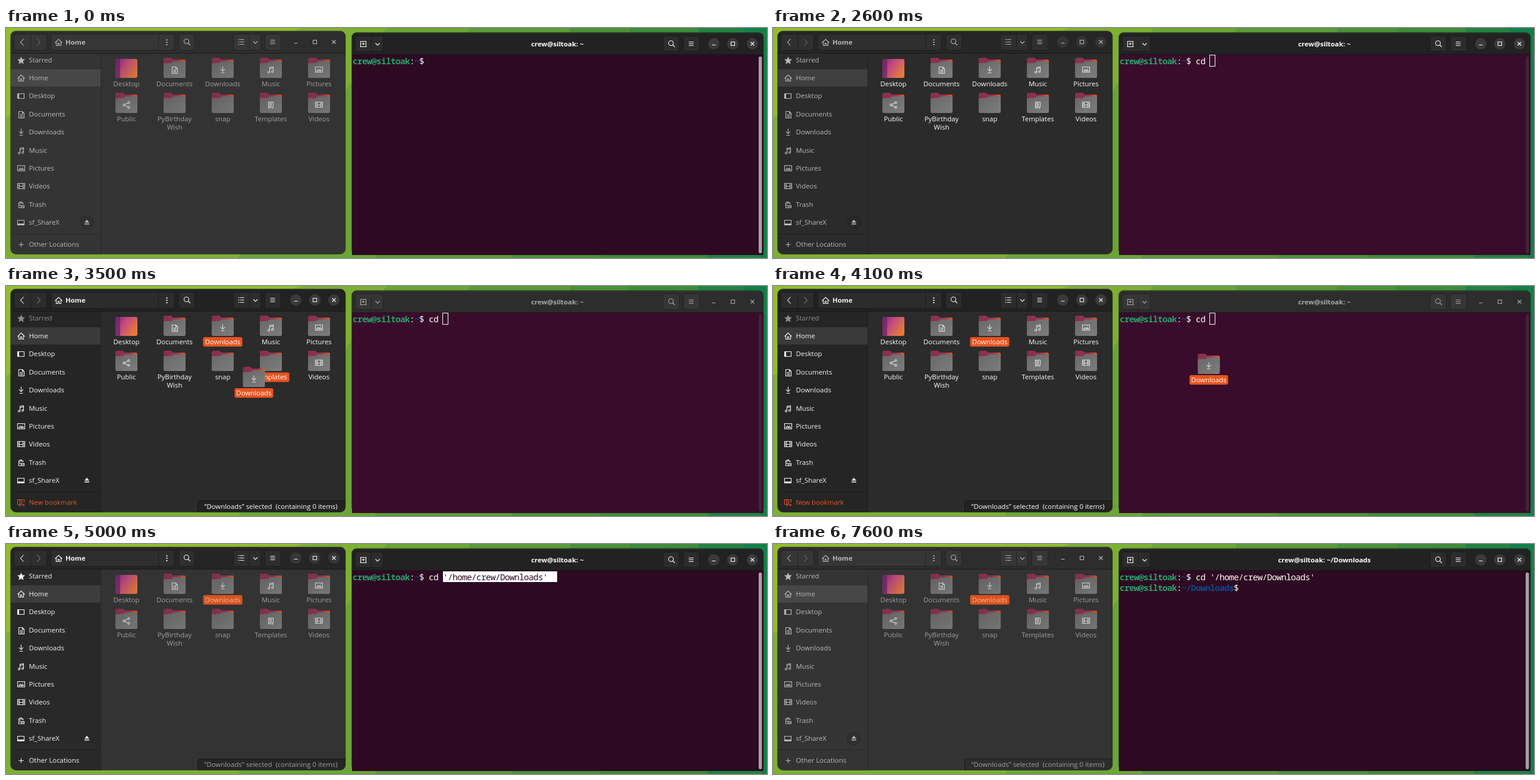
Recreate the animation shown at these times as an HTML page. Size 1280 by 387 pixels, loop 8.2 s.

```html
<!DOCTYPE html>
<html lang="en">
<head>
<meta charset="utf-8">
<title>Drag a folder into the terminal</title>
<style>
  html, body { margin: 0; width: 100%; height: 100%; overflow: hidden; background: #6ba536; }
  svg { display: block; width: 100vw; height: 100vh; }
  text { font: 500 11.4px "Open Sans", "Noto Sans", sans-serif; white-space: pre; }
  .bold { font-weight: 700; }
  .mid { text-anchor: middle; }
  .mono { font: 14.5px "Noto Sans Mono", "DejaVu Sans Mono", monospace; letter-spacing: -.7px; }
  .mono.bold { font-weight: 700; }
  .line { fill: none; stroke-width: 1.1; }
  .btn { fill: #fff; fill-opacity: .045; stroke: #000; stroke-opacity: .28; }
  .cut { stroke: #000; stroke-opacity: .35; }
  .fileText { fill: var(--fileText); }
  .fileLine { stroke: var(--fileText); }
  .termText { fill: var(--termText); }
  .termLine { stroke: var(--termText); }
  .label { fill: var(--label); }
</style>
</head>
<body>
<svg id="stage" viewBox="0 0 1280 387" xmlns="http://www.w3.org/2000/svg"></svg>
<script>
const LOOP = 8200, STEP = 100, CELL = 8;
const USER = 'crew', HOST = 'siltoak', LOGIN = `${USER}@${HOST}`;
const PASTED = `'/home/${USER}/Downloads'`;
const ORANGE = '#e95420', GREEN = '#26a269', BLUE = '#12488b', WHITE = '#ffffff';

// ---- markup helpers ----
const rect = (x, y, w, h, rx, attrs = '') =>
  `<rect x="${x}" y="${y}" width="${w}" height="${h}" rx="${rx}" ${attrs}/>`;
const text = (x, y, s, cls, attrs = '') =>
  `<text x="${x}" y="${y}" class="${cls}" ${attrs}>${s}</text>`;
const at = (x, y, body, attrs = '') =>
  `<g transform="translate(${x} ${y})" ${attrs}>${body}</g>`;
const line = (d, cls = '', attrs = '') => `<path d="${d}" class="line ${cls}" ${attrs}/>`;

// Line icons centred on 0,0
const GLYPH = {
  star: 'M0-5L1.5-1.6L5.2-1.3L2.4 1.2L3.3 5L0 3L-3.3 5L-2.4 1.2L-5.2-1.3L-1.5-1.6Z',
  home: 'M-6 .5L0-5.5L6 .5M-4-1V5H-1V1H1V5H4V-1',
  desktop: 'M-6-4H5V4H-6ZM-4-4V4M-5-4V4',
  doc: 'M-4-5H2L5-2V6H-4ZM2-5V-2H5M-2 0H3M-2 2H3M-2 4H3',
  down: 'M0-6V2M-3.6-1.4L0 2.3L3.6-1.4M-3 5H3',
  music: 'M-2 4V-4L4-5V3M-2-2L4-3M-5 4a1.5 1.5 0 1 0 3 0a1.5 1.5 0 1 0-3 0M1 3a1.5 1.5 0 1 0 3 0a1.5 1.5 0 1 0-3 0',
  picture: 'M-6-5H6V4H-6ZM-4 2L-1.5-1L.5 1L2.5-.5L4 2ZM2-3H3',
  video: 'M-6-5H6V4H-6ZM-3-5V4M3-5V4M-3 0H3M-6-2H-3M-6 1H-3M3-2H6M3 1H6',
  trash: 'M-5-3H4M-2-3V-5H1V-3M-4-3V5H-1M3-3V-1M-2-1V2M0 1H5V5H0ZM1 3H4',
  drive: 'M-6-4H5V4H-6ZM-6 2H5M-6 3H5',
  plus: 'M-4 0H4M0-4V4',
  mark: 'M-6-5H1V3H-6ZM-2-5V3M3-5H5V0M-4 5H0M2 4H6M4 2V6',
  share: 'M-2.6-.8L2.6-3.4M-2.6 .8L2.6 3.4M-5.6 0a1.6 1.6 0 1 0 3.2 0a1.6 1.6 0 1 0-3.2 0M2.4-4a1.6 1.6 0 1 0 3.2 0a1.6 1.6 0 1 0-3.2 0M2.4 4a1.6 1.6 0 1 0 3.2 0a1.6 1.6 0 1 0-3.2 0',
  ruler: 'M-4-5H-1V5H-4ZM-4-3H-2M-4 0H-2M-4 3H-2M1-5H4V3L2.5 5.5L1 3Z',
  find: 'M-5-1a4 4 0 1 0 8 0a4 4 0 1 0-8 0M2 2L5.5 5.5',
  menu: 'M-4-3H4M-4 0H4M-4 3H4',
  list: 'M-5-4H-3M-5 0H-3M-5 4H-3M-2-4H5M-2 0H5M-2 4H5',
  chevron: 'M-3.5-1.5L0 2L3.5-1.5',
  back: 'M2.5-5.5L-2.5 0L2.5 5.5',
  next: 'M-2.5-5.5L2.5 0L-2.5 5.5',
  tab: 'M-5 4V-5H4V4M-6 4H5M-3-1H2M-.5-3.5V1.5',
  min: 'M-3 2H3',
  max: 'M-3-3H3V3H-3Z',
  close: 'M-3-3L3 3M3-3L-3 3'
};
const icon = (name, x, y, cls, attrs = '') => at(x, y, line(GLYPH[name], cls, attrs));

function folder(name) {
  if (name === 'desktop') {
    return rect(-18.5, -15, 37, 32, 3, 'fill="url(#wall)"') +
      '<path d="M-10.5-15H-15.5a3 3 0 0 0-3 3V14a3 3 0 0 0 3 3H-10.5Z" fill="#6b2467" fill-opacity=".75"/>';
  }
  return '<path d="M-18.5 8V-14.5Q-18.5-17-16-17H-6.5Q-5-17-4-15.5L-3-14H16Q18.5-14 18.5-11.5V8Z" fill="url(#back)"/>' +
    '<path d="M-18.5-6Q-18.5-8-16.5-8H-6Q-5-8-4-9L-3-10Q-2-11-1-11H16.5Q18.5-11 18.5-9V14.5Q18.5 17 16 17H-16Q-18.5 17-18.5 14.5Z" fill="url(#front)"/>' +
    (name ? `<g class="mark">${icon(name, 0, 3.5, '', 'stroke="#dedede"')}</g>` : '');
}

const windowButtons = (xs, y, kind) =>
  ['min', 'max', 'close'].map((n, i) =>
    `<circle cx="${xs[i]}" cy="${y}" r="9.5" fill="#fff" fill-opacity=".11" class="${kind}Round"/>` +
    icon(n, xs[i], y, kind + 'Line')).join('');

// ---- wallpaper ----
const BANDS = [
  [-10, -800, '#93bd2d'], [500, -790, '#7cb033'], [640, 390, '#6ba536'], [780, 620, '#5a9a38'],
  [950, 850, '#4a9138'], [1050, 1000, '#3c8c3a'], [1165, 1180, '#228343'], [1240, 1270, '#128048']
];
const wallpaper = BANDS.map(([a, b, c]) =>
  `<path d="M${a} 0H1280V387H${b}Z" fill="${c}"/>`).join('');

// ---- file manager ----
const PLACES = [
  ['star', 'Starred'], ['home', 'Home'], ['desktop', 'Desktop'], ['doc', 'Documents'],
  ['down', 'Downloads'], ['music', 'Music'], ['picture', 'Pictures'], ['video', 'Videos'],
  ['trash', 'Trash'], ['drive', 'sf_ShareX'], ['plus', 'Other Locations']
];
const FOLDERS = [
  ['desktop', 'Desktop'], ['doc', 'Documents'], ['down', 'Downloads'], ['music', 'Music'],
  ['picture', 'Pictures'], ['share', 'Public'], ['', 'PyBirthday', 'Wish'], ['', 'snap'],
  ['ruler', 'Templates'], ['video', 'Videos']
];

const places = PLACES.map(([g, name], i) => {
  const y = g === 'plus' ? 364 : Math.round(53.5 + i * 30.4);
  const solid = g === 'star' ? 'style="fill:var(--fileText)"' : '';
  return `<g id="place${i}">` + icon(g, 25.5, y + .5, 'fileLine', solid) +
    text(38.5, y + 4, name, 'fileText') + '</g>';
}).join('');

const folders = FOLDERS.map(([g, name, more], i) => {
  const x = 202.5 + (i % 5) * 81, y = i < 5 ? 67 : 126;
  const pill = name === 'Downloads' ? rect(-33, 19, 66, 16, 3, 'id="picked"')
    : name === 'Templates' ? rect(-31, 19.5, 62, 16, 3, `id="target" fill="${ORANGE}"`) : '';
  return at(x, y, `<g class="pic">${folder(g)}</g>` + pill +
    text(0, 31, name, 'mid label') + (more ? text(0, 45, more, 'mid label') : ''), `id="item${i}"`);
}).join('');

const files =
  rect(7, 4.5, 564.5, 376.5, 10, 'fill="#1b2a12" fill-opacity=".55"') +
  '<g clip-path="url(#fileClip)">' +
  rect(8, 5, 563, 376, 0, 'style="fill:var(--fileBody)"') +
  rect(8, 43, 151, 338, 0, 'style="fill:var(--side)"') +
  rect(8, 69.5, 151, 29, 0, 'style="fill:var(--row)"') +
  '<path d="M159.5 43V381M8 346.5H159" stroke="#000" stroke-opacity=".22"/>' +
  rect(8, 5, 563, 37.5, 0, 'style="fill:var(--fileHead)"') +
  '<path d="M8 42.5H571" stroke="#000" stroke-opacity=".4"/>' +
  '<path d="M8 5.5H571" stroke="#fff" stroke-opacity=".07"/>' +
  [[13, 56], [75, 209], [290, 28], [382, 47], [435, 28]].map(([x, w]) =>
    rect(x + .5, 10.5, w - 1, 27, 4, 'class="btn"')).join('') +
  '<path class="cut" d="M41.5 11V37M256.5 11V37M409.5 11V37"/>' +
  icon('back', 27, 24, 'fileLine') + icon('next', 55, 24, 'fileLine', 'opacity=".4"') +
  icon('home', 88.5, 24.5, 'fileLine') + text(100, 28, 'Home', 'bold fileText') +
  '<path class="fileText" d="M269.5 19h2v2h-2zM269.5 23h2v2h-2zM269.5 27h2v2h-2z"/>' +
  icon('find', 304.5, 23.5, 'fileLine') + icon('list', 395.5, 23.5, 'fileLine') +
  icon('chevron', 419.5, 24, 'fileLine') + icon('menu', 448.5, 23.5, 'fileLine') +
  windowButtons([487.5, 519.5, 551.5], 23.5, 'file') +
  places +
  `<g id="bookmark">${icon('mark', 25.5, 364.5, '', `stroke="${ORANGE}"`)}` +
  text(38.5, 368, 'New bookmark', '', `fill="${ORANGE}"`) + '</g>' +
  '<circle id="ejectRing" cx="136" cy="327" r="11" fill="#000" fill-opacity=".08" stroke="#000" stroke-opacity=".2"/>' +
  '<path class="fileText" d="M136 322.5L140 327.5H132ZM132 329H140V330.5H132Z"/>' +
  folders +
  '<g id="status">' +
  '<path d="M322.5 382V366.5Q322.5 361.5 327.5 361.5H572V382Z" style="fill:var(--fileHead)" stroke="#111" stroke-opacity=".7"/>' +
  text(445.5, 375, '“Downloads” selected  (containing 0 items)', 'mid label') + '</g></g>';

// ---- terminal ----
const mono = (x, row, s, color, bold, attrs = '') =>
  text(x, 61 + row * 18, s, 'mono' + (bold ? ' bold' : ''), `fill="${color}" ${attrs}`);
const prompt = (row, path) => {
  const x = 583 + LOGIN.length * CELL;
  return mono(583, row, LOGIN, GREEN, true) + mono(x, row, ':', WHITE) +
    mono(x + CELL, row, path, BLUE, true) + mono(x + CELL * (1 + path.length), row, '$', WHITE);
};

const terminal =
  rect(581, 7, 693.5, 375, 9, 'fill="#14200f" fill-opacity=".6"') +
  '<g clip-path="url(#termClip)">' +
  rect(582, 8, 692, 374, 0, 'style="fill:var(--termBody)"') +
  rect(582, 8, 692, 37, 0, 'style="fill:var(--termHead)"') +
  '<path d="M582 8.5H1274" stroke="#fff" stroke-opacity=".07"/>' +
  '<path d="M582 44.5H1274" stroke="#000" stroke-opacity=".35"/>' +
  [[587, 48], [1105, 28], [1139, 28]].map(([x, w]) =>
    rect(x + .5, 13.5, w - 1, 26, 4, 'class="btn"')).join('') +
  '<path class="cut" d="M614.5 14V39"/>' +
  icon('tab', 601.5, 27.5, 'termLine') + icon('chevron', 625, 27, 'termLine') +
  icon('find', 1119.5, 26.5, 'termLine') + icon('menu', 1152.5, 26.5, 'termLine') +
  windowButtons([1190.5, 1222.5, 1255.5], 26.5, 'term') +
  text(927.5, 30.5, '', 'bold mid termText', 'id="title"') +
  rect(1266, 48, 5.5, 331, 2.7, 'style="fill:var(--bar)"') +
  prompt(0, '~') +
  mono(711, 0, '', WHITE, false, 'id="typed"') +
  rect(735, 46, 23 * CELL, 18, 0, 'id="glow" fill="#fff"') +
  mono(735, 0, PASTED, WHITE, false, 'id="pasted"') +
  `<g id="second">${prompt(1, '~/Downloads')}</g>` +
  rect(0, 0, CELL, 18, 0, 'id="cursor"') + '</g>';

const stage = document.getElementById('stage');
stage.innerHTML = `<defs>
  <linearGradient id="wall" x2="1" y2=".6"><stop stop-color="#7b2a72"/><stop offset=".45" stop-color="#c24a80"/><stop offset="1" stop-color="#e57a3c"/></linearGradient>
  <linearGradient id="back" x2="1"><stop stop-color="#84304f"/><stop offset=".6" stop-color="#96344a"/><stop offset="1" stop-color="#e4572a"/></linearGradient>
  <linearGradient id="front" x2="1" y2="1"><stop stop-color="#686868"/><stop offset="1" stop-color="#7d7d7d"/></linearGradient>
  <clipPath id="fileClip">${rect(8, 5, 563, 375.5, 9)}</clipPath>
  <clipPath id="termClip"><path d="M582 382V17Q582 8 591 8H1265Q1274 8 1274 17V382Z"/></clipPath>
</defs>` + wallpaper + files + terminal +
  `<g id="drag">${folder('down')}${rect(-32.5, 19, 65, 16, 3, `fill="${ORANGE}"`)}${text(0, 31, 'Downloads', 'mid', 'fill="#fff"')}</g>`;

// ---- timing ----
function track(keys) {
  return t => {
    if (t <= keys[0][0]) return keys[0][1];
    for (let i = 1; i < keys.length; i++) {
      const [a, u] = keys[i - 1], [b, v] = keys[i];
      if (t <= b) return u + (v - u) * (t - a) / (b - a);
    }
    return keys[keys.length - 1][1];
  };
}
const fileTone = track([[2500, 0], [2600, .6], [2700, 1], [4900, 1], [5000, .75], [5200, 0]]);
const fileInk = track([[2600, 0], [2900, 1], [5000, 1], [5200, 0]]);
const termTone = track([[2600, 1], [2900, 0], [4800, 0], [4900, .5], [5000, 1]]);
const dragX = track([[3300, 366], [3400, 366], [3500, 417], [3700, 527], [3900, 650], [4100, 733], [4300, 735]]);
const dragY = track([[3300, 73], [3400, 73], [3500, 153], [3600, 180], [3700, 193], [3800, 189], [4100, 131], [4300, 131]]);

// Cursor: [time, x, row]; x = 0 hides it
const CURSOR = [
  [0, 0, 0], [200, 711, 0], [800, 719, 0], [900, 727, 0], [1400, 0, 0], [1600, 727, 0],
  [1700, 735, 0], [2200, 0, 0], [2600, 735, 0], [4600, 919, 0], [5500, 0, 0],
  [5700, 791, 1], [6300, 0, 0], [6900, 791, 1], [7600, 0, 0]
];

const mix = (a, b, p) => {
  const part = (s, i) => parseInt(s.slice(i, i + 2), 16);
  return `rgb(${[1, 3, 5].map(i => Math.round(part(a, i) + (part(b, i) - part(a, i)) * p))})`;
};
const $ = id => document.getElementById(id);
const show = (id, on) => { $(id).style.display = on ? '' : 'none'; };
const fade = (selector, v) => stage.querySelectorAll(selector).forEach(e => { e.style.opacity = v; });
const paint = (name, v) => stage.style.setProperty('--' + name, v);

function render(t) {
  const within = (a, b) => t >= a && t < b;
  const active = within(2600, 4900), hold = within(3200, 4500);
  const tone = fileTone(t), ink = fileInk(t), term = termTone(t);

  paint('fileHead', mix('#2d2d2d', '#222222', tone));
  paint('side', mix('#343434', '#252525', tone));
  paint('row', mix('#474747', '#3a3a3a', tone));
  paint('fileText', mix('#b9b9b9', '#f5f5f5', ink));
  paint('fileBody', active ? '#2b2b2b' : '#333333');
  paint('label', active ? WHITE : '#a0a0a0');
  paint('termHead', mix('#2d2d2d', '#222222', term));
  paint('termText', mix('#a9a9a9', WHITE, term));
  paint('termBody', active ? '#380c2a' : '#2d0a21');
  paint('bar', active ? '#482039' : '#aaa0a7');
  fade('.fileRound', tone);
  fade('.termRound', term);
  fade('.pic', active ? 1 : .9);
  fade('#ejectRing', 1 - ink);

  // selection and drag feedback
  const picked = t >= 3100;
  show('picked', picked);
  show('status', picked);
  $('picked').style.fill = active ? ORANGE : '#d9521f';
  $('item2').querySelector('text').style.fill = picked ? (active ? WHITE : '#efb79f') : '';
  fade('#place0', hold ? .5 : 1);
  show('place10', !hold);
  show('bookmark', hold);
  const over = within(3500, 3600);
  show('target', over);
  $('item8').querySelector('.mark').style.display = over ? 'none' : '';
  show('drag', within(3300, 4500));
  $('drag').setAttribute('transform', `translate(${dragX(t)} ${dragY(t)})`);

  // shell
  $('typed').textContent = t >= 900 ? 'cd' : t >= 800 ? 'c' : '';
  const lit = within(4600, 5700);
  show('glow', lit);
  show('pasted', t >= 4600);
  $('pasted').setAttribute('fill', lit ? '#2d0a21' : WHITE);
  show('second', t >= 5700);
  $('title').textContent = `${LOGIN}: ~${t >= 5700 ? '/Downloads' : ''}`;

  const [, x, row] = CURSOR.filter(c => c[0] <= t).pop();
  const cur = $('cursor'), y = 46 + row * 18;
  show('cursor', x > 0);
  const box = active ? [x - .5, y - .5, 9, 19] : [x, y, CELL, 18];
  ['x', 'y', 'width', 'height'].forEach((k, i) => cur.setAttribute(k, box[i]));
  cur.setAttribute('fill', active ? 'none' : WHITE);
  cur.setAttribute('stroke', active ? WHITE : 'none');
}

const start = performance.now();
function tick() {
  const t = (performance.now() - start) % LOOP;
  render(Math.floor(t / STEP) * STEP);
  requestAnimationFrame(tick);
}
tick();
</script>
</body>
</html>
```
